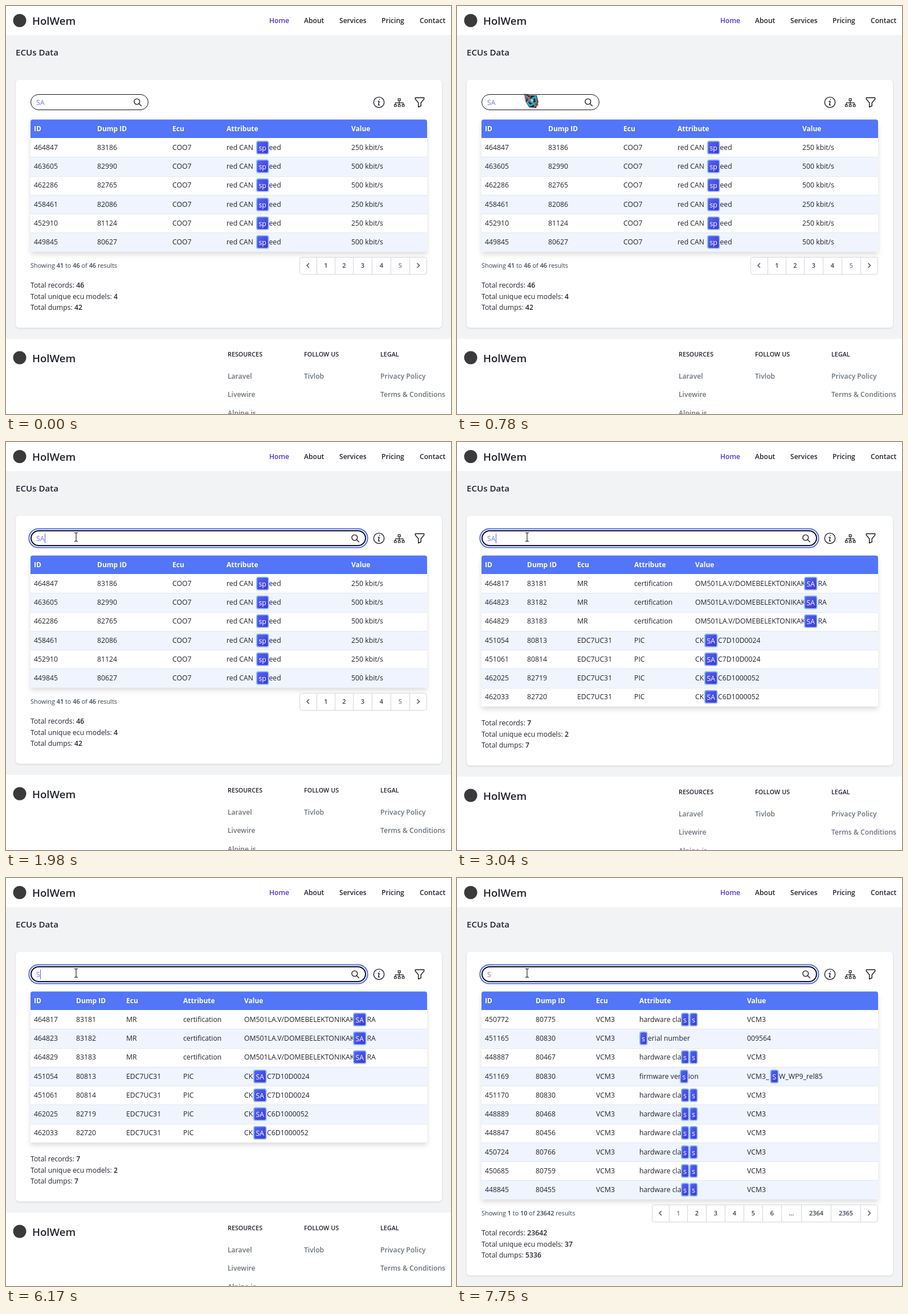
Recreate the animation shown at these times as an HTML page. Size 781x717 px, loop 8 s.

```html
<!DOCTYPE html>
<html lang="en">
<head>
<meta charset="utf-8">
<title>ECUs Data</title>
<style>
  html, body { margin: 0; width: 100%; height: 100%; overflow: hidden; background: #f2f3f5; }
  svg { display: block; width: 781px; height: 717px; font-family: "Open Sans", "Noto Sans", sans-serif; }
  .card { filter: drop-shadow(0 1px 1.5px #0002); }
  .table { filter: drop-shadow(0 5px 4px #0002); }
  .line { fill: none; stroke: #1b1b24; stroke-width: 1.4; stroke-linecap: round; stroke-linejoin: round; }
  .thin { stroke-width: 1.15; }
</style>
</head>
<body>
<svg viewBox="0 0 781 717">
  <defs>
    <linearGradient id="pill" x1="0" y1="0" x2="1" y2="1">
      <stop offset="0" stop-color="#5269f3"/><stop offset="1" stop-color="#4035d2"/>
    </linearGradient>
  </defs>
  <g id="page"></g>
  <g id="toolbar"></g>
  <g id="search">
    <rect id="ring" x="40.3" y="152.4" height="33.2" rx="16.6" fill="#fff" stroke="#4f6ff0" stroke-width="2"/>
    <rect id="field" x="43.5" y="155.5" height="27" rx="13.5" fill="#fff" stroke="#111119"/>
    <g id="lens" class="line"><circle cx="-1.2" cy="-1.3" r="4.9"/><path d="M2.5 2.5L6.4 6.3"/></g>
    <text id="query" x="53" y="174" font-size="12.3" fill="#7274ee"></text>
    <rect id="caret" y="161" width="1" height="17" fill="#4f5fe8"/>
  </g>
  <g id="pointer" stroke-linejoin="round">
    <path d="M0 0L9 3L22 3L25 15L21 25L9 24L3 15Z" fill="#1d2547"/>
    <path d="M3 3L21 22M5 15L20 5L22 15L10 21Z" fill="none" stroke="#24b3b5" stroke-width="3"/>
    <path d="M1 1L4 11M11 4L7 11L13 16M20 10L24 20L17 23" fill="none" stroke="#d7474f" stroke-width="2.2"/>
    <circle cx="14" cy="12" r="2.5" fill="#7ce0d8"/>
  </g>
  <path id="beam" d="M-3 -7.5H-1L0 -6.5L1 -7.5H3M0 -6.5V6.5M-3 7.5H-1L0 6.5L1 7.5H3" fill="none" stroke="#111" stroke-width="1.1"/>
</svg>
<script>
const $ = id => document.getElementById(id);
const LOOP = 8000, ROW = 33.25, TABLE_TOP = 232;
const INK = '#20232d', BLUE = '#5375f7', GREY = '#6b7280';

// Text centred vertically on y.
const text = (x, y, str, { size = 12.25, weight = 400, fill = INK, anchor = 'start' } = {}) =>
  `<text x="${x}" y="${y + size * .36}" font-size="${size}" font-weight="${weight}" fill="${fill}" text-anchor="${anchor}">${str}</text>`;
const rect = (x, y, w, h, fill, extra = '') =>
  `<rect x="${x}" y="${y}" width="${w}" height="${h}" fill="${fill}" ${extra}/>`;
const bold = str => `<tspan font-weight="600">${str}</tspan>`;

// A rich cell is a list of [x, text, highlightWidth?].
const speed = [[387, 'red CAN'], [439, 'sp', 22], [461.5, 'eed']];
const hardware = [[320, 'hardware cla'], [393, 's', 14], [408, 's', 14]];
const serial = [[320, 's', 14], [335, 'erial number']];
const firmware = [[320, 'firmware ver'], [391, 's', 14.5], [406, 'ion']];
const release = [[509, 'VCM3_'], [549.5, 'S', 14.5], [565, 'W_WP9_rel85']];
const workshop = [[418, 'OM501LA.V/DOMEBELEKTONIKAK'], [609, 'SA', 23], [633.5, 'RA']];
const chip = code => [[418, 'CK'], [434, 'SA', 23], [458, code]];

const views = [
  {
    columns: [49, 160, 292, 387, 606],
    rows: [[464847, 83186, 250], [463605, 82990, 500], [462286, 82765, 500],
           [458461, 82086, 250], [452910, 81124, 250], [449845, 80627, 500]]
      .map(([id, dump, rate]) => [id, dump, 'COO7', speed, rate + ' kbit/s']),
    shown: [41, 46, 46], totals: [46, 4, 42],
    pages: ['1', '2', '3', '4', '5'], current: '5',
    edges: [515, 545, 577, 609, 642, 675, 708, 739]
  },
  {
    columns: [49, 123, 211, 311, 418],
    rows: [
      ...[[464817, 83181], [464823, 83182], [464829, 83183]].map(r => [...r, 'MR', 'certification', workshop]),
      ...[[451054, 80813, 'C7D10D0024'], [451061, 80814, 'C7D10D0024'],
          [462025, 82719, 'C6D1000052'], [462033, 82720, 'C6D1000052']]
        .map(([id, dump, code]) => [id, dump, 'EDC7UC31', 'PIC', chip(code)])
    ],
    totals: [7, 2, 7]
  },
  {
    columns: [49, 138, 244, 320, 509],
    rows: [[450772, 80775], [451165, 80830, serial, '009564'], [448887, 80467],
           [451169, 80830, firmware, release], [451170, 80830], [448889, 80468],
           [448847, 80456], [450724, 80766], [450685, 80759], [448845, 80455]]
      .map(([id, dump, attribute = hardware, value = 'VCM3']) => [id, dump, 'VCM3', attribute, value]),
    shown: [1, 10, 23642], totals: [23642, 37, 5336],
    pages: ['1', '2', '3', '4', '5', '6', '...', '2364', '2365'], current: '1',
    edges: [342, 372, 404, 437, 470, 503, 536, 569, 604, 656, 708, 739]
  }
];

function cell(content, x, y) {
  if (!Array.isArray(content)) return text(x, y, content);
  return content.map(([px, str, width]) => width
    ? rect(px + .9, y - 11.4, width - 1.3, 22.3, 'url(#pill)', 'rx="3" stroke="#8fbcfb" stroke-width="1.8"') +
      text(px + width / 2 + .2, y + .4, str, { fill: '#fff', anchor: 'middle' })
    : text(px, y, str)).join('');
}

function table({ columns, rows }) {
  const height = rows.length * ROW;
  let out = rect(43, 205, 696, TABLE_TOP - 205 + height, '#fff', 'class="table"') +
    `<path d="M43 232V203.4a4 4 0 0 1 4-4H735a4 4 0 0 1 4 4V232Z" fill="${BLUE}"/>`;
  ['ID', 'Dump ID', 'Ecu', 'Attribute', 'Value'].forEach((name, i) =>
    out += text(columns[i], 216, name, { size: 12, weight: 700, fill: '#fff' }));
  rows.forEach((row, i) => {
    const y = TABLE_TOP + i * ROW;
    if (i % 2) out += rect(43, y, 696, ROW, '#eff4ff');
    if (i) out += rect(43, Math.round(y), 696, 1, '#e2e6ee');
    out += row.map((content, c) => cell(content, columns[c], Math.round(y + 16.8))).join('');
  });
  return out;
}

function pagination({ shown, pages, current, edges }, y) {
  const [from, to, all] = shown.map(bold), last = edges.length - 1;
  let out = text(43, y, `Showing ${from} to ${to} of ${all} results`, { size: 10.9, fill: '#374151' }) +
    rect(edges[0] + .5, y - 14.5, edges[last] - edges[0] - 1, 30, '#fff', 'rx="4" stroke="#d1d5db"');
  for (const x of edges.slice(1, -1)) out += rect(x, y - 15, 1, 31, '#d1d5db');
  pages.forEach((page, i) => out += text((edges[i + 1] + edges[i + 2]) / 2 + .5, y, page,
    { size: 11, weight: 600, fill: page === current ? '#7b818c' : '#374151', anchor: 'middle' }));
  const chevron = (x, d) => `<path d="M${x - d} ${y - 4}l${2 * d} 4l${-2 * d} 4" fill="none" stroke="#4b5563" stroke-width="1.5"/>`;
  return out + chevron((edges[0] + edges[1]) / 2, -2) + chevron((edges[last - 1] + edges[last]) / 2, 2);
}

const brand = y => `<circle cx="24" cy="${y - 1}" r="11.5" fill="#3a3a3c"/>` +
  text(46, y, 'HolWem', { size: 18.6, weight: 600 });

function footer(top) {
  const columns = [
    [389, 'RESOURCES', 'Laravel', 'Livewire', 'Alpine.js'],
    [523, 'FOLLOW US', 'Tivlob'],
    [657, 'LEGAL', 'Privacy Policy', 'Terms &amp; Conditions']
  ];
  return rect(0, top, 781, 200, '#fff') + brand(top + 34) + columns.map(([x, title, ...links]) =>
    text(x, top + 27.5, title, { size: 10.8, weight: 600 }) +
    links.map((link, i) => text(x, top + 65.5 + i * 32.5, link, { size: 12.15, weight: 600, fill: GREY })).join('')
  ).join('');
}

function page(view) {
  const bottom = TABLE_TOP + view.rows.length * ROW;
  const totals = Math.floor(bottom + (view.shown ? 60 : 29.5));
  const cardEnd = totals + 74.5;
  const nav = [[462, 'Home'], [523, 'About'], [585, 'Services'], [659, 'Pricing'], [726, 'Contact']];
  return rect(0, 0, 781, 717, '#f2f3f5') + rect(0, 0, 781, 51, '#fff') + brand(26.5) +
    nav.map(([x, name], i) => text(x, 25.5, name, { size: 12.1, weight: 600, fill: i ? INK : '#4a35d0' })).join('') +
    text(17, 82, 'ECUs Data', { size: 15.1, weight: 600 }) +
    rect(17, 129.5, 748, cardEnd - 129.5, '#fff', 'rx="6" class="card"') +
    table(view) + (view.shown ? pagination(view, Math.floor(bottom + 24.9)) : '') +
    ['Total records', 'Total unique ecu models', 'Total dumps'].map((label, i) =>
      text(43, totals + i * 19.5, `${label}: ${bold(view.totals[i])}`)).join('') +
    footer(cardEnd + 19.5);
}

$('toolbar').innerHTML = `<g class="line">
  <circle cx="654.5" cy="169.3" r="9.2"/>
  <path d="M653 167.5h2l-1.4 6.5h2M655.6 164v.3"/>
  <g class="thin">
    <path d="M688.2 162.8h4v3.6h-4zM690.2 166.4v6.8M683.3 173.2v-3.1h13.8v3.1"/>
    <path d="M681.5 173.4h3.6v3.4h-3.6zM688.4 173.4h3.6v3.4h-3.6zM695.3 173.4h3.6v3.4h-3.6z"/>
  </g>
  <path d="M718.3 161.2h15.4v2.3l-5.4 6.5v5.5l-4.6 2.2v-7.7l-5.4-6.5z"/></g>`;

// Piecewise-linear lookup through [time, ...values] keys.
function track(keys, t) {
  let i = 1;
  while (i < keys.length - 1 && keys[i][0] < t) i++;
  const [a, b] = [keys[i - 1], keys[i]];
  const k = Math.min(1, Math.max(0, (t - a[0]) / (b[0] - a[0])));
  return a.slice(1).map((v, n) => v + (b[n + 1] - v) * k);
}

// CSS "ease": cubic-bezier(.25, .1, .25, 1).
function ease(x) {
  if (x <= 0 || x >= 1) return x <= 0 ? 0 : 1;
  const curve = (p, q, s) => 3 * (1 - s) ** 2 * s * p + 3 * (1 - s) * s * s * q + s ** 3;
  let low = 0, high = 1;
  for (let i = 0; i < 24; i++) {
    const mid = (low + high) / 2;
    if (curve(.25, .25, mid) < x) low = mid; else high = mid;
  }
  return curve(.1, 1, low);
}

const path = [[150, 717, -12], [300, 530, 20], [450, 335, 60], [600, 205, 98], [710, 138, 132],
              [780, 118, 154], [830, 111, 159], [880, 118, 164], [950, 123, 167]];
const caretToggles = [990, 1490, 1980, 2500, 3040, 3550, 4040, 4590, 5130, 5640, 6170, 6680, 7210, 7750];
const FOCUS = 985, ERASE = 4390, OVER_FIELD = 840;
const show = (id, on) => $(id).setAttribute('visibility', on ? 'visible' : 'hidden');
const move = (id, x, y) => $(id).setAttribute('transform', `translate(${x} ${y})`);
let currentView;

function draw() {
  const t = performance.now() % LOOP;
  const view = views[t < 2600 ? 0 : t < 7550 ? 1 : 2];
  if (view !== currentView) $('page').innerHTML = page(currentView = view);

  const focused = t >= FOCUS;
  const right = 250 + 382 * (focused ? ease((t - 978) / 700) : 0);
  const inset = focused ? 1 : .5;
  const field = $('field');
  field.setAttribute('x', 43 + inset);
  field.setAttribute('y', 155 + inset);
  field.setAttribute('width', right - 43 - 2 * inset);
  field.setAttribute('height', 28 - 2 * inset);
  field.setAttribute('stroke-width', 2 * inset);
  $('ring').setAttribute('width', right + 2.7 - 40.3);
  show('ring', focused);
  move('lens', right - 19, 169.3);

  $('query').textContent = t < ERASE ? 'SA' : 'S';
  $('caret').setAttribute('x', t < ERASE ? 68 : 60);
  show('caret', caretToggles.filter(time => time <= t).length % 2);

  const [x, y] = track(path, t);
  move('pointer', x, y);
  move('beam', x, y);
  show('pointer', t >= 150 && t < OVER_FIELD);
  show('beam', t >= OVER_FIELD);
  requestAnimationFrame(draw);
}
draw();
</script>
</body>
</html>
```
